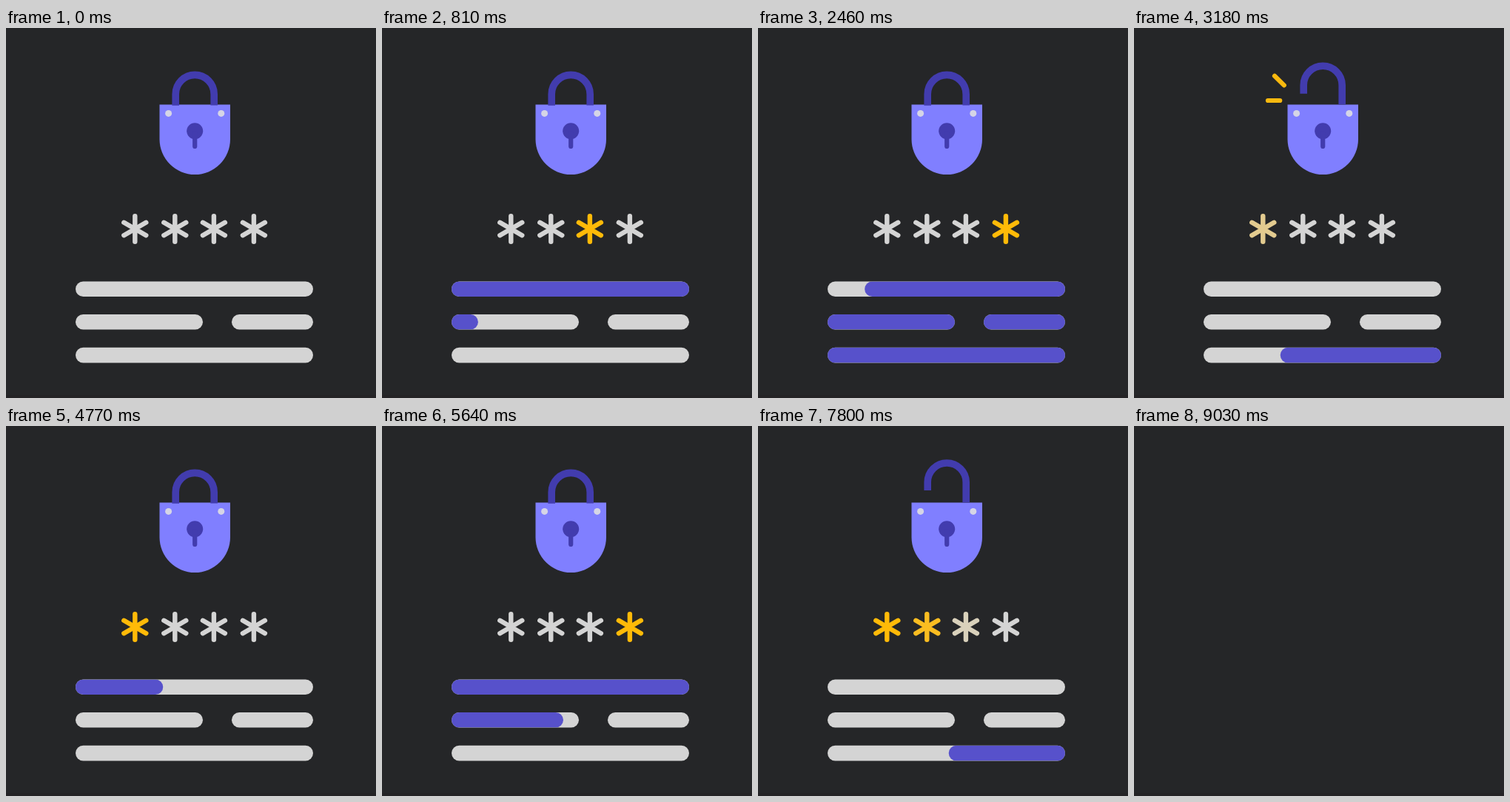
An HTML page with a canvas that plays this animation: 500x500 px, repeating every 9060 ms.

```html
<!DOCTYPE html>
<html lang="en">
<head>
<meta charset="utf-8">
<title>Password lock</title>
<style>
html, body { margin: 0; width: 100%; height: 100%; overflow: hidden; background: #252628; }
canvas { display: block; width: 500px; height: 500px; }
</style>
</head>
<body>
<canvas id="stage" width="500" height="500"></canvas>
<script>
const ctx = document.getElementById('stage').getContext('2d');
const LOOP = 9060, CYCLE = 4515, STEP = 30;
const GREY = [212, 212, 212], YELLOW = [255, 186, 8];

// Each bar: x, y, width, then start and length of its fill and of its clearing
const BARS = [
  [94, 342.4, 321, 0, 620, 2330, 520],
  [94, 387, 172, 620, 646, 2520, 460],
  [305, 387, 110, 1266, 450, 2700, 430],
  [94, 431.8, 321, 1670, 620, 2866, 827]
];
const STARS = [174.3, 228.3, 280.9, 334.9];

// Eased progress from 0 to 1
function ramp(t, start, length) {
  const x = Math.min(1, Math.max(0, (t - start) / length));
  return x * x * (3 - 2 * x);
}

function mix(a, b, k) {
  return `rgb(${a.map((v, i) => Math.round(v + (b[i] - v) * k))})`;
}

function line(x1, y1, x2, y2, width, color) {
  ctx.lineCap = 'round';
  ctx.lineWidth = width;
  ctx.strokeStyle = color;
  ctx.beginPath();
  ctx.moveTo(x1, y1);
  ctx.lineTo(x2, y2);
  ctx.stroke();
}

function dot(x, y, r, color) {
  ctx.fillStyle = color;
  ctx.beginPath();
  ctx.arc(x, y, r, 0, Math.PI * 2);
  ctx.fill();
}

function pill(x, y, w) {
  ctx.beginPath();
  ctx.roundRect(x, y, w, 20.6, 10.3);
}

function drawBar(t, [x, y, w, fillAt, fillFor, clearAt, clearFor]) {
  ctx.fillStyle = '#d4d4d4';
  pill(x, y, w);
  ctx.fill();
  const head = ramp(t, fillAt, fillFor), tail = ramp(t, clearAt, clearFor);
  if (head === 0 || tail === 1) return;
  ctx.save();
  pill(x, y, w);
  ctx.clip();
  const left = tail > 0 ? x + w * tail : x - 24;
  const right = head < 1 ? x + w * head : x + w + 24;
  ctx.fillStyle = '#5751cb';
  pill(left, y, right - left);
  ctx.fill();
  ctx.restore();
}

// Stars chase one by one, then all light up when the lock opens
function starLevel(t, i) {
  if (t < 2680) {
    const u = t % 1340 - i * 335;
    return ramp(u, 0, 100) - ramp(u, 262, 70);
  }
  return ramp(t, 3137 + i * 62, 110) - ramp(t, 4000, 240);
}

function drawStar(x, level) {
  const color = mix(GREY, YELLOW, level), y = 271.5;
  for (let k = 0; k < 3; k++) {
    const a = Math.PI / 6 + k * Math.PI / 3;
    const dx = Math.cos(a) * 17.3, dy = Math.sin(a) * 17.3;
    line(x - dx, y - dy, x + dx, y + dy, 6.4, color);
  }
}

function drawLock(t) {
  const open = ramp(t, 2890, 360) - ramp(t, 3950, 300);
  const top = 89.4 - 13.4 * open;

  ctx.fillStyle = '#807fff';
  ctx.beginPath();
  ctx.moveTo(207.5, 103.5);
  ctx.lineTo(303, 103.5);
  ctx.lineTo(303, 150.3);
  ctx.arc(255.25, 150.3, 47.75, 0, Math.PI);
  ctx.closePath();
  ctx.fill();

  ctx.lineCap = 'butt';
  ctx.lineWidth = 9.6;
  ctx.strokeStyle = '#423cae';
  ctx.beginPath();
  ctx.moveTo(229.2, 104.8 - 17.8 * open);
  ctx.lineTo(229.2, top);
  ctx.arc(255.2, top, 26, Math.PI, 0);
  ctx.lineTo(281.2, 104.5 - open);
  ctx.stroke();

  dot(219.6, 115.4, 4.5, '#d5d5e6');
  dot(290.8, 115.4, 4.5, '#d5d5e6');
  dot(255.2, 139.3, 11, '#423cae');
  line(255.2, 142, 255.2, 160, 6.2, '#423cae');
}

// A spark shoots out from its inner end and then shrinks away
function drawSpark(t, x1, y1, x2, y2) {
  const head = ramp(t, 3050, 110), tail = ramp(t, 3185, 85);
  if (head === 0 || tail === 1) return;
  const dx = x2 - x1, dy = y2 - y1;
  line(x1 + dx * tail, y1 + dy * tail, x1 + dx * head, y1 + dy * head, 6.2, '#f9b90f');
}

function draw(time) {
  ctx.fillStyle = '#252628';
  ctx.fillRect(0, 0, 500, 500);
  ctx.fillStyle = '#242325';
  ctx.fillRect(0, 496, 500, 4);
  if (time >= CYCLE * 2) return;
  const t = time % CYCLE;
  drawLock(t);
  drawSpark(t, 202.8, 77.4, 190, 64.8);
  drawSpark(t, 197.2, 98, 181, 98);
  STARS.forEach((x, i) => drawStar(x, starLevel(t, i)));
  BARS.forEach(bar => drawBar(t, bar));
}

const begin = performance.now();
function tick() {
  const time = (performance.now() - begin) % LOOP;
  draw(Math.floor(time / STEP) * STEP);
  requestAnimationFrame(tick);
}
tick();
</script>
</body>
</html>
```
